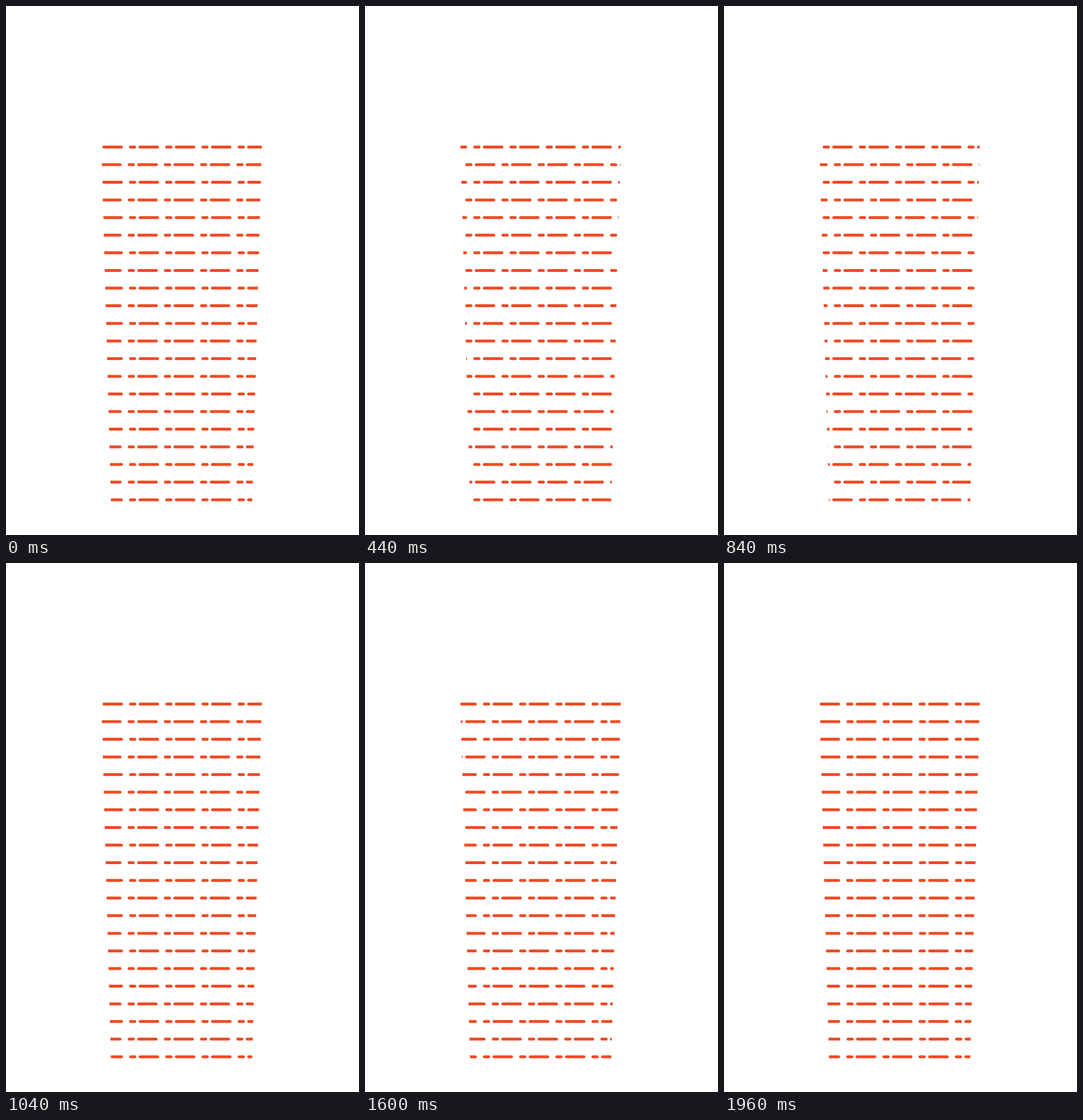
Write an HTML page with a canvas that moves like this. It is 611 px wide and 917 px high and loops after 2000 ms.

```html
<!DOCTYPE html>
<html lang="en">
<head>
<meta charset="utf-8">
<title>Sliding dashes</title>
<style>
html, body { margin: 0; width: 100%; height: 100%; overflow: hidden; background: #fff; }
canvas { display: block; width: 611px; height: 917px; }
</style>
</head>
<body>
<canvas id="stage"></canvas>
<script>
const W = 611, H = 917, LOOP = 2000, STEP = 40;
const ROWS = 21, TOP = 244.4, GAP = 30.575, THICK = 5;
const PERIOD = 62.65, LONG = 35.4, SHORT = 12.4, LEAD = 16.6;
const CENTER = 228.4, START = 1.1;

// half-cycle progress, travel in px, speed
const KEYS = [
  [0, 0, 0],
  [0.04, 1.4, 60],
  [0.28, 35.7, 240],
  [0.4, 71.4, 390],
  [0.6, 175.7, 640],
  [0.64, 201.7, 640],
  [1, 314.4, 0]
];

const canvas = document.getElementById("stage");
const ctx = canvas.getContext("2d");
const ratio = window.devicePixelRatio || 1;
canvas.width = W * ratio;
canvas.height = H * ratio;

function travel(u) {
  let i = 1;
  while (i < KEYS.length - 1 && u > KEYS[i][0]) i++;
  const [u0, y0, v0] = KEYS[i - 1], [u1, y1, v1] = KEYS[i];
  const h = u1 - u0, s = (u - u0) / h, r = 1 - s;
  return y0 * (1 + 2 * s) * r * r + y1 * s * s * (3 - 2 * s)
    + h * s * r * (v0 * r - v1 * s);
}

function dash(x, y, w) {
  ctx.roundRect(x, y - THICK / 2, w, THICK, THICK / 2);
}

function row(y, phase) {
  const first = phase - Math.ceil((phase - 90) / PERIOD) * PERIOD;
  for (let x = first; x < 480; x += PERIOD) {
    dash(x - LEAD, y, SHORT);
    dash(x, y, LONG);
  }
}

function draw(t) {
  const u = 1 - Math.abs(1 - t / (LOOP / 2));
  const shift = START - travel(u);

  ctx.setTransform(ratio, 0, 0, ratio, 0, 0);
  ctx.fillStyle = "#fff";
  ctx.fillRect(0, 0, W, H);

  ctx.save();
  ctx.beginPath();
  ctx.moveTo(165.1, 240);
  ctx.lineTo(442.8, 240);
  ctx.lineTo(426.2, 860);
  ctx.lineTo(181.7, 860);
  ctx.clip();

  ctx.fillStyle = "#f04a24";
  ctx.beginPath();
  for (let i = 0; i < ROWS; i++) {
    row(TOP + i * GAP, CENTER + (i % 2 ? -shift : shift));
  }
  ctx.fill();
  ctx.restore();
}

const begin = performance.now();
function tick() {
  const t = (performance.now() - begin) % LOOP;
  draw(Math.floor(t / STEP) * STEP);
  requestAnimationFrame(tick);
}
draw(0);
requestAnimationFrame(tick);
</script>
</body>
</html>
```
